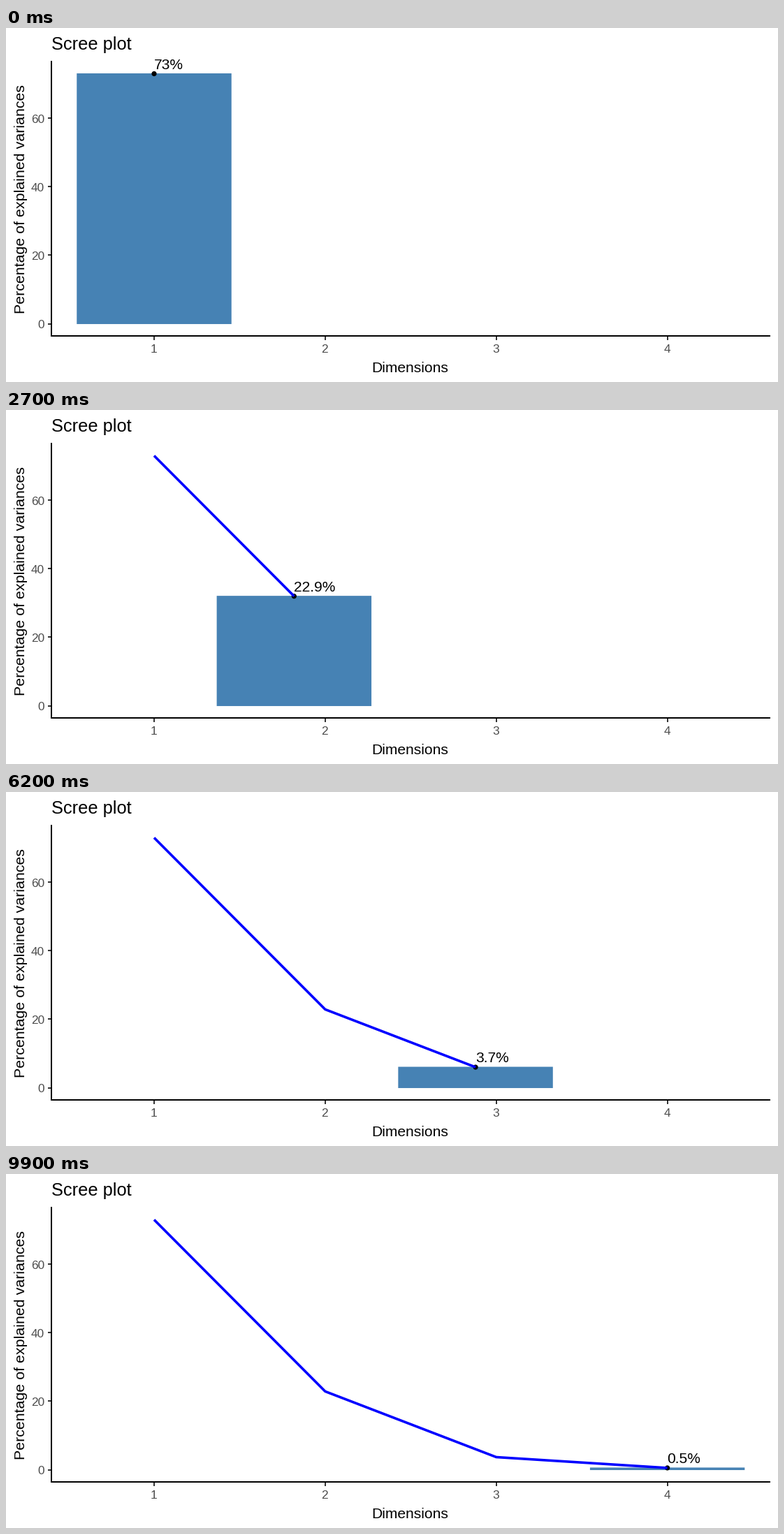
A matplotlib script for the animation above (10000 ms loop, 1105 by 507 pixels).

```python
import matplotlib.pyplot as plt
import numpy as np
from matplotlib.animation import FuncAnimation
from matplotlib.patches import Circle, Rectangle

W, H, DPI = 1105, 507, 100
FRAMES, INTERVAL = 100, 100

DIMS = np.arange(1, 5)
SHARES = np.array([72.96, 22.85, 3.67, 0.52])
LABELS = ["73%", "22.9%", "3.7%", "0.5%"]

# Panel geometry in pixels, y pointing down
LEFT, RIGHT, TOP, BOTTOM = 65, 1094, 47, 441
X_ONE, X_UNIT = 212, 244.87
Y_ZERO, Y_UNIT = 423.5, 4.907
RULE, TRAIL, EDGE = 2, 3.6, 0.53
BAR_HALF = 0.45 * X_UNIT + EDGE
TICK = 5.5

plt.rcParams["font.family"] = "Liberation Sans"


def pt(px):
    return px * 72 / DPI


def to_x(dim):
    return X_ONE + (dim - 1) * X_UNIT


def to_y(share):
    return Y_ZERO - share * Y_UNIT


fig = plt.figure(figsize=(W / DPI, H / DPI), dpi=DPI, facecolor="white")
ax = fig.add_axes([0, 0, 1, 1])
ax.set_xlim(0, W)
ax.set_ylim(H, 0)
ax.axis("off")


def write(x, y, text, px, color="black", **kw):
    return ax.text(x, y, text, fontsize=pt(px), color=color,
                   va="baseline", **kw)


def rule(xs, ys, color="black", z=5):
    ax.plot(xs, ys, color=color, lw=pt(RULE), solid_capstyle="butt", zorder=z)


# Axes, ticks and titles
rule([LEFT, LEFT], [TOP, BOTTOM + 1])
rule([LEFT - 1, RIGHT], [BOTTOM, BOTTOM])
for d in DIMS:
    rule([to_x(d)] * 2, [BOTTOM, BOTTOM + TICK], "#333333", 4)
    write(to_x(d) - 0.5, 465, str(d), 17.3, "#4D4D4D", ha="center")
for v in range(0, 61, 20):
    rule([LEFT - TICK, LEFT], [to_y(v)] * 2, "#333333", 4)
    write(55, to_y(v) + 6.6, str(v), 17.3, "#4D4D4D", ha="right")
write(65, 31, "Scree plot", 25.4)
write(578.2, 493, "Dimensions", 21, ha="center")
write(27.5, 245, "Percentage of explained variances", 21.35, ha="center",
      rotation=90, rotation_mode="anchor")

# Moving parts
bar = ax.add_patch(Rectangle((0, 0), 2 * BAR_HALF, 1, fc="steelblue",
                             ec="none", snap=False, zorder=1))
dot = ax.add_patch(Circle((0, 0), 3.6, fc="black", ec="none", zorder=2))
trail, = ax.plot([], [], color="blue", lw=pt(TRAIL), solid_capstyle="butt",
                 snap=False, zorder=3)
label = write(0, 0, "", 21, zorder=3)
panel = Rectangle((LEFT, TOP), RIGHT - LEFT, BOTTOM - TOP,
                  transform=ax.transData)
label.set_clip_path(panel)


def update(i):
    pos = 1 + 3 * i / (FRAMES - 1)
    share = np.interp(pos, DIMS, SHARES)
    x, y = to_x(pos), to_y(share)

    bar.set_x(x - BAR_HALF)
    bar.set_y(y - EDGE)
    bar.set_height(Y_ZERO - y + 2 * EDGE)
    dot.center = (x, y)

    past = DIMS < pos
    trail.set_data(np.append(to_x(DIMS[past]), x),
                   np.append(to_y(SHARES[past]), y))
    # The label jumps to the next value halfway between dimensions
    label.set_text(LABELS[int(pos - 0.5)])
    label.set_position((x, y - 6.6))
    return bar, dot, trail, label


anim = FuncAnimation(fig, update, frames=FRAMES, interval=INTERVAL,
                     repeat=True, repeat_delay=0, blit=False)
plt.show()
```
